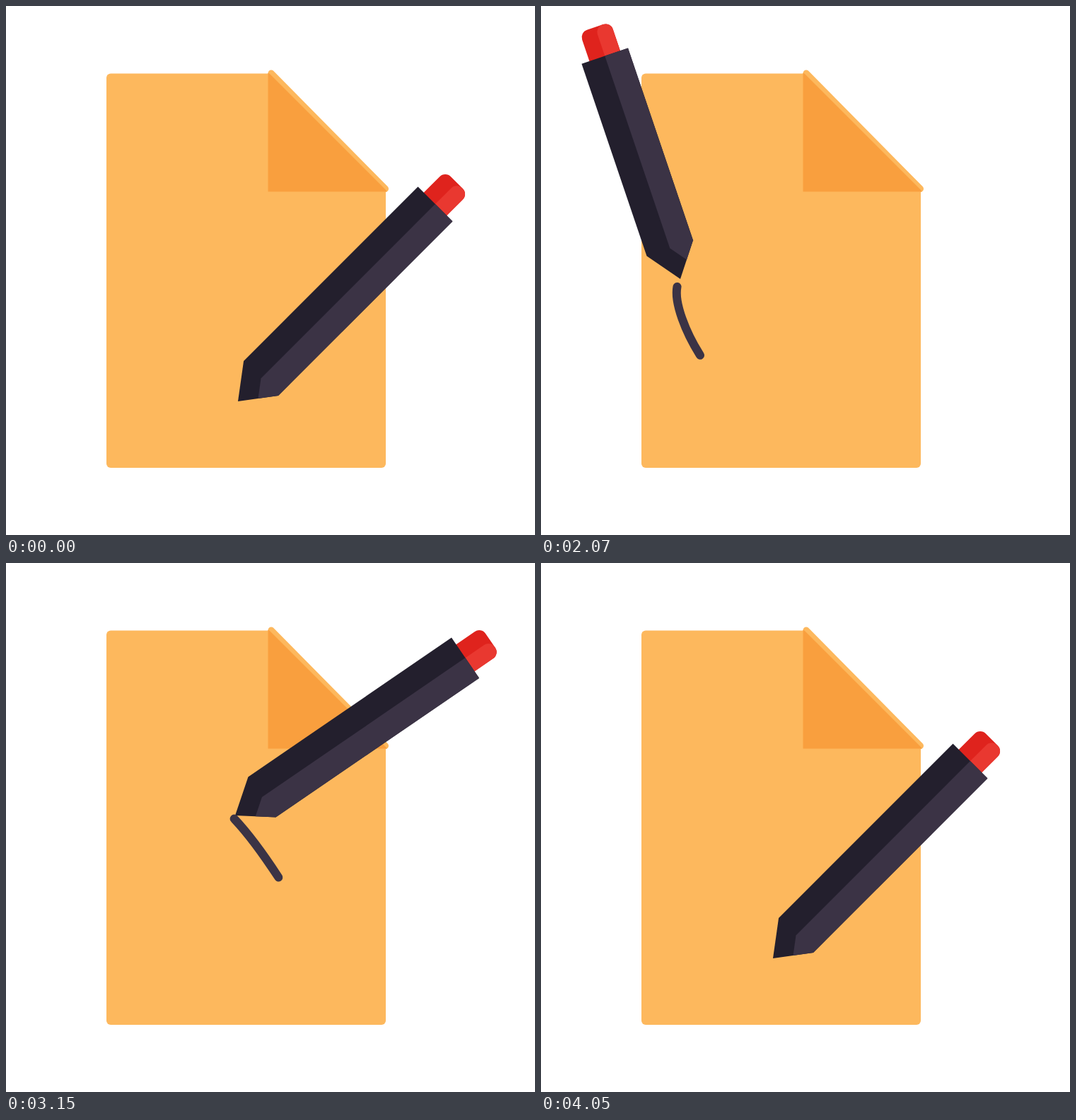
These frames come from a looping animation (748x748 px, 4.08 s). An HTML page:

```html
<!DOCTYPE html>
<html lang="en">
<head>
<meta charset="utf-8">
<title>Pencil on paper</title>
<style>
  html, body { margin: 0; height: 100%; overflow: hidden; background: #fff; }
  svg { display: block; width: 100%; height: 100%; }
  #ink { fill: none; stroke: #3b3345; stroke-width: 12; stroke-linecap: round; }
</style>
</head>
<body>
<svg viewBox="0 0 748 748">
  <g fill="#fdb85d">
    <path d="M148 95.5H375L537 259V647a6 6 0 0 1-6 6H148a6 6 0 0 1-6-6V101.500a6 6 0 0 1 6-6Z"/>
    <path d="M375 95L536.500 258.500" stroke="#fdb85d" stroke-width="9" stroke-linecap="round"/>
  </g>
  <path d="M370.500 94.500L373 96L537 260L538.500 262.500H370.500Z" fill="#f99f3e"/>
  <g id="pencil">
    <g id="eraser">
      <path d="M-23 1V-32a11 11 0 0 1 11-11H12a11 11 0 0 1 11 11V1Z" fill="#df231d"/>
      <path d="M0 1V-32a11 11 0 0 1 11-11H12a11 11 0 0 1 11 11V1Z" fill="#e93830"/>
    </g>
    <path id="dark" fill="#231f2d"/>
    <path id="light" fill="#3b3345"/>
  </g>
  <path id="ink"/>
</svg>
<script>
const LOOP = 4080, STEP = 30, START = 1530, END = 4050;
const el = id => document.getElementById(id);
const [pencil, eraser, dark, light, ink] = ['pencil', 'eraser', 'dark', 'light', 'ink'].map(el);

const parts = [
  'M318 561C290 571 252 537 224.5 493C205 462 188 420 192.5 397',
  'C196 377 222 370 261 392C288 407 318 428 347 449',
  'C372 467 395 481 398 473C400 468 393 456 385 444C366 415 341 381 323 362',
  'C315 354 308 352 311 366C316 385 331 421 338 441',
  'C350 475 350 540 315 556'
];
// path length at the end of each part
const [a, b, c, d, total] = parts.map((_, i) => {
  ink.setAttribute('d', parts.slice(0, i + 1).join(''));
  return ink.getTotalLength();
});

// smooth curve through [time, value] keys that never overshoots them
function track(...keys) {
  const rate = i => (keys[i + 1][1] - keys[i][1]) / (keys[i + 1][0] - keys[i][0]);
  const slope = keys.map((_, i) => {
    if (!i || i === keys.length - 1) return 0;
    const p = rate(i - 1), q = rate(i);
    return p * q > 0 ? 2 * p * q / (p + q) : 0;
  });
  return t => {
    if (t <= keys[0][0]) return keys[0][1];
    const i = keys.findIndex(k => k[0] >= t) - 1;
    if (i < 0) return keys[keys.length - 1][1];
    const [t0, v0] = keys[i], [t1, v1] = keys[i + 1];
    const h = t1 - t0, u = (t - t0) / h, w = 1 - u;
    return w * w * (1 + 2 * u) * v0 + u * u * (3 - 2 * u) * v1
      + h * u * w * (w * slope[i] - u * slope[i + 1]);
  };
}

const head = track([1530, 0], [1800, 75], [2070, a], [2190, a + 65], [2550, b],
  [2730, b + 36], [3150, c], [3510, d], [3660, d + 75], [3960, total]);
const gap = track([3660, 104], [4050, 0]);
const angle = track([1530, 44.6], [1800, 12], [2070, -18.7], [2220, -29], [2370, -33],
  [2460, -32], [2550, -24.8], [2730, 0], [3150, 55.6], [3510, 58.9], [3660, 58], [4050, 45]);
const size = track([1530, 348.5], [1800, 340], [2070, 287], [2160, 272], [2280, 285], [2550, 348.5]);
const dx = track([1530, 12], [2070, 4.5], [2550, 7], [3150, 1], [3510, 5], [4050, 13]);
const dy = track([1530, -3], [2070, -11], [2550, 2], [3150, -5], [3510, 5], [4050, 3]);

function draw(t) {
  if (t < START) t = END;
  const s = head(t), tail = Math.max(0, s - gap(t)), p = ink.getPointAtLength(s);
  const top = -46 - size(t);
  pencil.setAttribute('transform',
    `translate(${p.x + dx(t)} ${p.y + dy(t)}) rotate(${angle(t)})`);
  eraser.setAttribute('transform', `translate(0 ${top})`);
  dark.setAttribute('d', `M0 0L-34.6 -46V${top}H34.6V-46Z`);
  light.setAttribute('d', `M0 ${top}H34.6V-46L17.3 -23L0 -46Z`);
  ink.style.visibility = s - tail > 0.5 ? 'visible' : 'hidden';
  ink.style.strokeDasharray = `${s - tail} 9999`;
  ink.style.strokeDashoffset = -tail;
}

const begin = performance.now();
function tick() {
  const t = (performance.now() - begin) % LOOP;
  draw(Math.floor(t / STEP) * STEP);
  requestAnimationFrame(tick);
}
tick();
</script>
</body>
</html>
```
